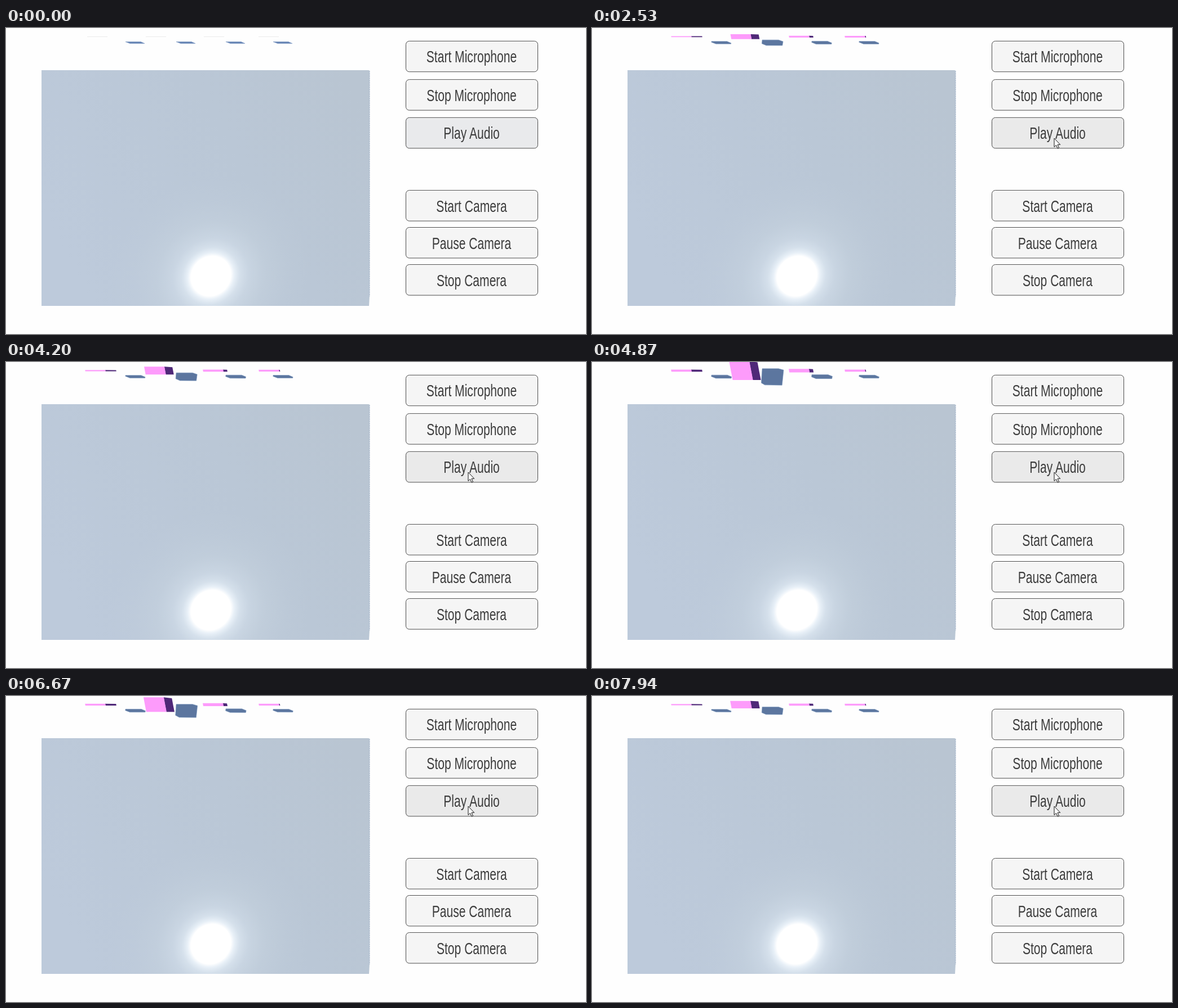
An HTML page that plays this animation: 1029x544 px, repeating every 8000 ms.

```html
<!DOCTYPE html>
<html lang="en">
<head>
<meta charset="utf-8">
<title>Microphone and camera controls</title>
<style>
html, body { margin: 0; width: 100%; height: 100%; overflow: hidden; background: #fefefe; }
svg { display: block; width: 100vw; height: 100vh; }
text { font: 29px "Liberation Sans", Arial, sans-serif; fill: #3d3d3d; text-anchor: middle; }
</style>
</head>
<body>
<svg id="stage" viewBox="0 0 1029 544" preserveAspectRatio="none">
  <defs>
    <linearGradient id="sky" x1="0" y1="0.6" x2="1" y2="0.2">
      <stop offset="0" stop-color="#bdcadb"/>
      <stop offset="0.6" stop-color="#bac7d6"/>
      <stop offset="1" stop-color="#b9c5d2"/>
    </linearGradient>
    <radialGradient id="glow">
      <stop offset="0" stop-color="#fff"/>
      <stop offset="0.2" stop-color="#fff"/>
      <stop offset="0.235" stop-color="#f0f7fd" stop-opacity="0.85"/>
      <stop offset="0.29" stop-color="#e6f0f8" stop-opacity="0.6"/>
      <stop offset="0.38" stop-color="#dfeaf3" stop-opacity="0.38"/>
      <stop offset="0.55" stop-color="#d8e4ea" stop-opacity="0.19"/>
      <stop offset="0.78" stop-color="#d4e0e6" stop-opacity="0.06"/>
      <stop offset="1" stop-color="#d4e0e6" stop-opacity="0"/>
    </radialGradient>
    <clipPath id="view"><path d="M63 75H643Q645 75 645 77V477L644 494H63Z"/></clipPath>
  </defs>
  <g clip-path="url(#view)">
    <rect x="63" y="75" width="582" height="420" fill="url(#sky)"/>
    <ellipse rx="184" ry="170" fill="url(#glow)" transform="translate(363.5 441) rotate(-45)"/>
  </g>
  <path d="M645 76V477" stroke="#a3b3c8" stroke-dasharray="3 1"/>
  <g id="bars"></g>
  <g id="buttons"></g>
  <path id="cursor" d="M.5 .5V16L4 12.8L6.6 18.6L9 17.5L6.5 11.8H11.2Z" fill="#fff" stroke="#111"/>
</svg>
<script>
const LOOP = 8000, STEP = 66.8, FIRST = 390, SOUND = 2115;
const $ = id => document.getElementById(id);

function add(parent, tag, attrs) {
  const el = document.createElementNS("http://www.w3.org/2000/svg", tag);
  for (const k in attrs) el.setAttribute(k, attrs[k]);
  parent.appendChild(el);
  return el;
}

function addButton(label, y) {
  const g = $("buttons");
  const face = add(g, "rect", { x: 709.5, y, width: 234, height: 54.5, rx: 6, fill: "#f5f5f5", stroke: "#4c4c4c" });
  add(g, "path", { d: `M715 ${y + 1.5}H938`, stroke: "#fff", "stroke-opacity": 0.7 });
  add(g, "text", { transform: `translate(826 ${y + 38}) scale(.727 1)` }).textContent = label;
  return face;
}

addButton("Start Microphone", 23.3);
addButton("Stop Microphone", 91.7);
const play = addButton("Play Audio", 159.3);
addButton("Start Camera", 288.6);
addButton("Pause Camera", 354.5);
addButton("Stop Camera", 420.6);

// Each bar: left edge, side width, and height as base + gain * level
const pinks = [
  { x: 140.5, side: 19, base: 0.6, gain: 0.075 },
  { x: 246.4, side: 14, base: 0, gain: 1 },
  { x: 349.5, side: 7, base: 1, gain: 0.12 },
  { x: 448.5, side: 1.5, base: 1.4, gain: 0.025 }
];
const blues = [
  { x: 212, base: 0.5, gain: 0.07 },
  { x: 302, base: 0, gain: 1 },
  { x: 390, base: 0.9, gain: 0.1 },
  { x: 474, base: 0.9, gain: 0.03 }
];
const idleLines = [144, 248, 351, 448];

const bars = $("bars");
const idle = add(bars, "path", { d: idleLines.map(x => `M${x} 15.5h36`).join(""), stroke: "#ebebeb" });
for (const p of pinks) {
  p.sideFace = add(bars, "path", { fill: "#4f2878" });
  p.front = add(bars, "path", { fill: "#fd9bfb" });
}
for (const b of blues) b.body = add(bars, "path", { "stroke-linejoin": "round", "stroke-width": 0.6 });

// Loudness over time: [ms, level]
const levels = [
  [2100, 1], [2450, 4.6], [2860, 2.4], [3200, 4], [3460, 3], [3800, 4.2], [4300, 7.4], [4600, 6.5],
  [4866, 17], [5070, 20], [5400, 16], [5600, 18.7], [5934, 8.6], [6300, 11.5], [6669, 13.2],
  [6870, 13.6], [7240, 9], [7480, 10.4], [7938, 6.7], [8000, 6.5]
];

function track(points, t) {
  if (t <= points[0][0]) return points[0][1];
  for (let i = 1; i < points.length; i++) {
    const [t0, v0] = points[i - 1], [t1, v1] = points[i];
    if (t < t1) {
      const u = (t - t0) / (t1 - t0);
      return v0 + (v1 - v0) * u * u * (3 - 2 * u);
    }
  }
  return points[points.length - 1][1];
}

const poly = pts => "M" + pts.map(p => p.map(n => n.toFixed(2)).join(" ")).join("L") + "Z";

function drawPink(p, level) {
  const h = p.base + p.gain * level, cy = 15.4;
  const at = (x, y) => [x + 0.19 * (y - cy), y];
  const right = p.x + 36, far = right + p.side;
  const top = cy - h, bottom = cy + h * 0.98;
  p.front.setAttribute("d", poly([at(p.x, top), at(right, top), at(right, bottom), at(p.x, bottom)]));
  p.sideFace.setAttribute("d", poly([at(right - 0.3, top), at(far, cy - h * 0.87), at(far, bottom), at(right - 0.3, bottom)]));
}

function drawBlue(b, level, active) {
  const h = active ? b.base + b.gain * level : 0, x = b.x;
  const spread = Math.min(h, 3) / 3;
  b.body.setAttribute("d", poly([
    [x, 24.4 - 0.74 * h],
    [x + 27 + 2 * spread, 24.4 - 0.74 * h],
    [x + 34 + 2.6 * spread + h * 0.08, 27.5 - 0.78 * h],
    [x + 34 + 2 * spread - h * 0.05, 27.6 + 0.8 * h],
    [x + 8 - h * 0.2, 27.6 + 0.78 * h],
    [x - 0.3 * spread - h * 0.08, 24.6 + 0.74 * h]
  ]));
  b.body.setAttribute("fill", active ? "#5c769f" : "#6381b2");
  b.body.setAttribute("stroke", active ? "#7895bd" : "#7f9bc6");
}

function playFill(t) {
  if (t < 1590) return "#e9eaec";
  if (t < 1650) return "#d6d6d7";
  if (t < 1785) return "#c2c2c2";
  if (t < 1845) return "#d6d6d6";
  return "#eaeaea";
}

function drawCursor(t) {
  const cursor = $("cursor");
  cursor.setAttribute("visibility", t < FIRST ? "hidden" : "visible");
  const u = Math.min(1, Math.max(0, (t - FIRST) / (7 * STEP)));
  const left = (1 - u) ** 1.7;
  const lift = t < 1055 ? 2 : t < 1120 ? 1 : 0;
  cursor.setAttribute("transform", `translate(${820 + 151 * left - 0.5} ${195.5 + lift + 314 * left})`);
}

function draw(time) {
  const t = FIRST + Math.floor((time - 380) / STEP) * STEP;
  const active = t >= SOUND, level = track(levels, t);
  idle.setAttribute("visibility", active ? "hidden" : "visible");
  for (const p of pinks) {
    drawPink(p, level);
    for (const face of [p.front, p.sideFace]) face.setAttribute("visibility", active ? "visible" : "hidden");
  }
  for (const b of blues) drawBlue(b, level, active);
  play.setAttribute("fill", playFill(t));
  drawCursor(t);
}

const start = performance.now();
function frame() {
  draw((performance.now() - start) % LOOP);
  requestAnimationFrame(frame);
}
frame();
</script>
</body>
</html>
```
